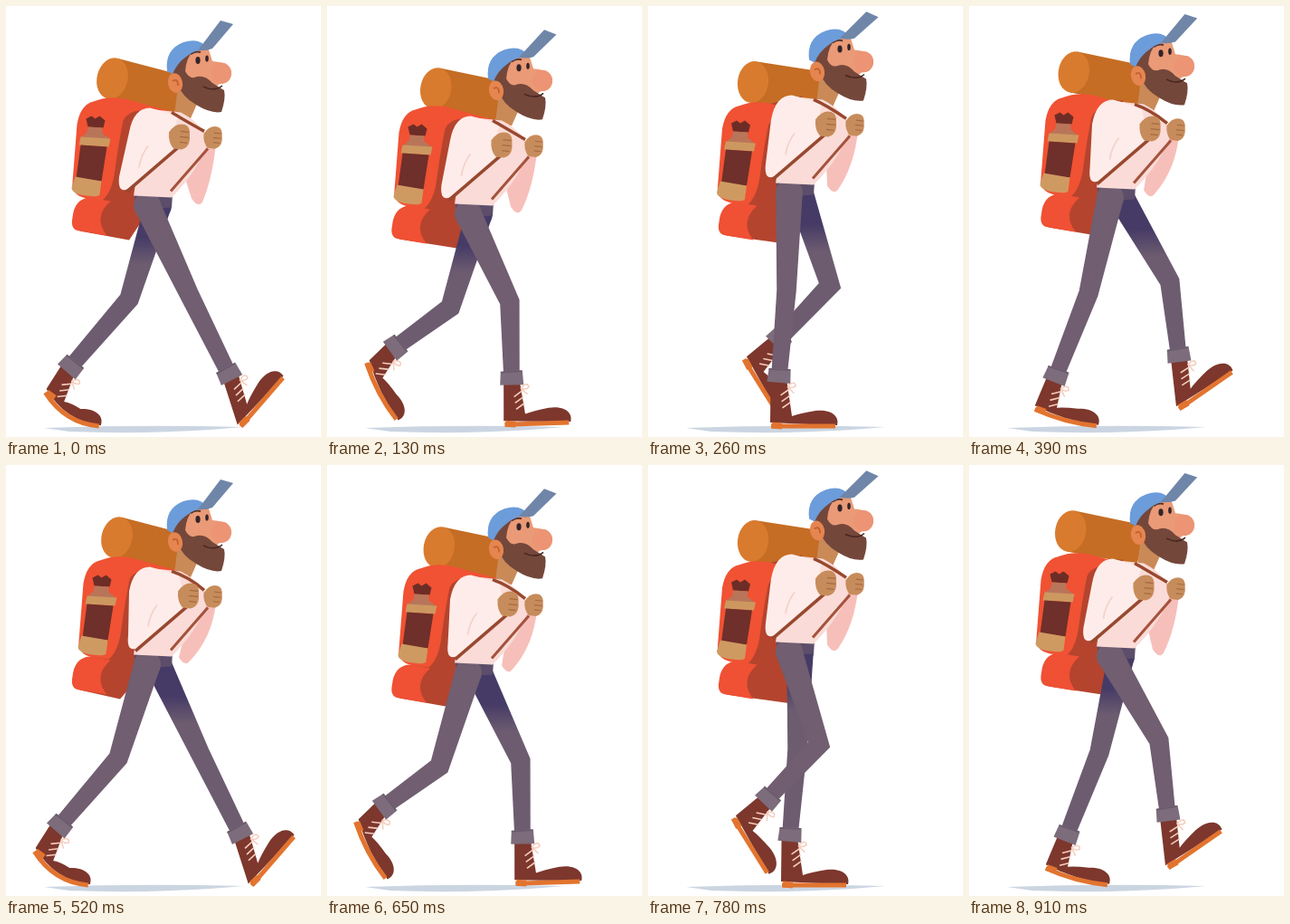
These frames come from a looping animation (348 by 476 pixels, 1040 ms). An HTML page with a canvas:

```html
<!DOCTYPE html>
<html lang="en">
<head>
<meta charset="utf-8">
<title>Walking hiker</title>
<style>
html, body { margin: 0; width: 348px; height: 476px; overflow: hidden; background: #fff; }
canvas { display: block; }
</style>
</head>
<body>
<canvas id="stage" width="348" height="476"></canvas>
<script>
const ctx = document.getElementById('stage').getContext('2d');
const STEP = 130, POSES = 8, GROUND = 467;
const THIGH = 108, FOOT = 74;

// mean plus harmonics, given as cosine and sine amounts
const wave = (p, mean, ...parts) =>
  parts.reduce((sum, [c, s], i) => sum + c * Math.cos((i + 1) * p) + s * Math.sin((i + 1) * p), mean);

const fill = (d, color) => { ctx.fillStyle = color; ctx.fill(new Path2D(d)); };
const line = (d, color, width) => {
  ctx.strokeStyle = color;
  ctx.lineWidth = width;
  ctx.stroke(new Path2D(d));
};
const oval = (x, y, rx, ry, color, turn = 0) => {
  ctx.fillStyle = color;
  ctx.beginPath();
  ctx.ellipse(x, y, rx, ry, turn, 0, 7);
  ctx.fill();
};
const placed = (x, y, degrees, draw) => {
  ctx.save();
  ctx.translate(x, y);
  ctx.rotate(degrees * Math.PI / 180);
  draw();
  ctx.restore();
};
const unit = (a, b) => {
  const dx = b[0] - a[0], dy = b[1] - a[1], len = Math.hypot(dx, dy);
  return [dx / len, dy / len];
};
// point p moved by i along u and by j along v
const at = (p, u, i, v = [0, 0], j = 0) => [p[0] + u[0] * i + v[0] * j, p[1] + u[1] * i + v[1] * j];
const front = u => [u[1], -u[0]];

function boot(cuff, shin, heel, angle, bend) {
  const p = front(shin), d = [Math.cos(angle), Math.sin(angle)], n = front(d);
  const toe = at(heel, d, FOOT), mid = at(heel, d, FOOT / 2, n, -bend);
  const e = unit(mid, toe), up = front(e);
  const ankle = at(cuff, shin, 6), top = at(ankle, p, 9);
  const instep = at(heel, d, 24, n, 14 - bend / 2);
  fill(`M${at(ankle, p, -9)} L${at(heel, n, 7)} Q${at(mid, n, 5)} ${at(toe, up, 4)}
    C${at(toe, e, 3, up, 15)} ${at(toe, e, -8, up, 22)} ${at(toe, e, -24, up, 20)}
    Q${at(instep, d, 8, n, 3)} ${instep} L${top}Z`, '#7d372d');
  line(`M${at(heel, d, 1, n, 3)} Q${at(mid, n, 3)} ${at(toe, e, -2, up, 3)}`, '#e2742f', 5);
  line(`M${at(heel, d, 2, n, 4)} L${at(heel, d, 13, n, 3)}`, '#e2742f', 7);
  const down = unit(top, instep), across = front(down);
  for (const k of [9, 16, 23]) {
    const s = at(top, down, k);
    line(`M${at(s, across, 1)} L${at(s, across, -9, down, 5)}`, '#f6cdbd', 1.6);
  }
  const knot = at(top, down, 6);
  line(`M${knot} Q${at(knot, across, 8, down, -7)} ${at(knot, across, 9)}
    Q${at(knot, across, 5, down, 3)} ${knot} L${at(knot, across, 6, down, 8)}`, '#f6cdbd', 1.5);
}

// p is the phase of the stride: 0 at heel strike, half a turn later push-off
function leg(p, shift, hipY, color) {
  const hip = [156 + shift, hipY];
  const reach = wave(p, 12, [47, -9], [-4, -4], [-8, 9]);
  const knee = [155 + shift + reach, hipY + Math.sqrt(THIGH ** 2 - reach ** 2)];
  const cuff = [shift + wave(p, 146, [93, 6], [7, -12]), wave(p, 395, [4, 20], [7, -1.5])];
  const heel = [
    shift + wave(p, 129, [114, 14], [16, -17], [2, -8]),
    Math.min(GROUND, wave(p, 439, [22, 32], [9, -9], [-3, -7]))
  ];
  const angle = wave(p, 10, [-40, -17], [-19, 20], [0, 12]) * Math.PI / 180;
  const bend = 18 * Math.max(0, -Math.cos(p)) ** 3;

  const thigh = unit(hip, knee), shin = unit(knee, cuff);
  const a = front(thigh), b = front(shin), joint = unit([0, 0], [a[0] + b[0], a[1] + b[1]]);
  const half = 10 / (joint[0] * b[0] + joint[1] * b[1]);
  boot(cuff, shin, heel, angle, bend);
  oval(...hip, 15, 15, color);
  const d = `M${at(hip, a, -14)} L${at(knee, joint, -half)} L${at(cuff, b, -8)}
    L${at(cuff, b, 8)} L${at(knee, joint, half)} L${at(hip, a, 14)}Z`;
  fill(d, color);
  line(d, color, 1.5);
  fill(`M${at(cuff, b, -12, shin, -7)} L${at(cuff, b, 12, shin, -8)}
    L${at(cuff, b, 13, shin, 8)} L${at(cuff, b, -13, shin, 8)}Z`, '#7d6c7b');
  line(`M${at(cuff, b, -12, shin, -6)} L${at(cuff, b, 11, shin, -7)}`, '#685a6b', 1.5);
}

// the load trails the body's bob
function pack(p, shoulderX, shoulderY, waist) {
  const dx = wave(p, 2, [-3.5, 0]), dy = wave(p, 3, [0, 0], [-2.5, 6.5]);
  const px = wave(p, 76, [0, 0], [-2.5, -4]), py = 245 + dy;
  const qx = wave(p, 145, [5, 0], [-14, -5]), qy = 258 + dy;
  placed(wave(p, 118, [-2.5, 0], [2, 4]), wave(p, 82, [0, 0], [-2, 9]), wave(p, 11, [0, 0], [3, 0]), () => {
    fill('M0 -23 L72 -22 Q82 0 79 22 L0 23Z', '#c56d24');
    oval(0, 0, 17, 23, '#d97b2e');
  });
  fill(`M${110 + dx} ${108 + dy} L${shoulderX + 15} ${shoulderY} L168 ${waist} L${qx} ${qy}
    L${px + 8} ${py + 3} L${px + 22} ${py - 36}Z`, '#b4442e');
  fill(`M${px + 42} ${py - 30} L${px + 18} ${py - 34} Q${px + 2} ${py - 32} ${px} ${py - 12}
    Q${px - 3} ${py + 2} ${px + 8} ${py + 3} L${px + 38} ${py + 8}
    Q${px + 22} ${py - 12} ${px + 42} ${py - 30}Z`, '#f05033');
  placed(dx, dy, 0, () => {
    fill(`M98 105 Q118 97 140 104 L188 117 L192 130 Q180 120 160 116 Q138 112 131 126
      Q126 150 122 180 Q119 205 108 214 L90 212 Q73 208 75 194 L80 130 Q84 108 98 105Z`, '#f05233');
    fill('M90 124 L96 121 L100 124 L105 121 L111 126 L109 134 L92 133Z', '#6d2d26');
    fill('M92 133 L108 134 L108 140 L116 146 L84 145 L91 139Z', '#b9755a');
    fill('M84 144 L117 146 L115 155 L82 153Z', '#cd9860');
    fill('M84 153 L113 155 L107 193 L79 190Z', '#6f2f2a');
    fill('M78 188 L107 193 L105 208 Q103 211 90 209 Q74 207 74 200Z', '#cf9a62');
  });
}

function head(dy, brim) {
  placed(0, dy, 0, () => {
    fill('M190 86 L212 104 L204 122 L186 118Z', '#c98a58');
    fill('M190 74 Q194 42 222 40 L228 59 Q247 60 249 71 Q249 84 236 84 L225 92 L200 92Z', '#ea9a76');
    oval(238, 72, 11, 11.5, '#ec9474');
    fill(`M184 72 Q188 50 208 46 Q199 55 198 70 Q203 80 211 76 Q220 74 228 83 Q236 88 241 91
      Q243 100 238 115 Q226 117 210 107 Q194 98 190 84Z`, '#74473b');
    line('M218 87 Q231 93 239 86', '#45261f', 1.5);
    oval(187, 83, 8, 11, '#e58550', -0.2);
    line('M184 81 Q190 77 190 86', '#c4622f', 1.8);
    oval(212, 58, 2.6, 4, '#33242a');
    oval(222, 56, 1.8, 3.6, '#33242a');
    line('M204 51 Q210 47 215 49', '#54352e', 2);
    fill('M178 70 Q175 46 196 38 Q214 32 223 45 Q208 46 199 54 Q189 61 184 73Z', '#6c9cda');
    placed(219, 46, brim, () => fill('M-7 1 L18 -32 L32 -28 L9 -1 Q2 2 -7 1Z', '#6f86a9'));
  });
}

function hand(x, y, size) {
  placed(x, y, 0, () => {
    ctx.scale(size, size);
    fill('M-12 -5 Q-6 -14 2 -14 Q10 -14 11 -6 L11 3 Q10 12 2 14 L-7 13 Q-13 6 -12 -5Z', '#c78c5b');
    line('M1 -6 L10 -5 M0 0 L10 1 M0 6 L8 7', '#a56a40', 1.2);
  });
}

function torso(p, bob, sx, sy, w) {
  const swing = Math.cos(p);
  const nx = 197 - 5 * swing, ny = 141 + bob;
  const fx = 229, fy = 142 + bob;
  const ex = 130 - 5 * swing, ey = 199 + bob;
  const gx = 207 + 7 * swing, gy = 216 + bob;
  // far sleeve
  fill(`M${fx - 16} ${fy + 2} L${fx + 3} ${fy + 6} Q${fx - 1} ${fy + 45} ${gx + 3} ${gy - 3}
    Q${gx - 2} ${gy + 4} ${gx - 9} ${gy - 7} L${fx - 32} ${fy + 42}Z`, '#f7bfba');
  head(0.9 * bob - 1, wave(p, 4, [0, 0], [-4, 1.5]));
  fill(`M${sx} ${sy} L${sx + 38} ${sy + 4} Q${fx - 12} ${fy - 16} ${fx - 6} ${fy + 4}
    Q${fx - 16} ${fy + 36} 183 ${w + 1} L141 ${w - 1}Z`, '#fadbd7');
  line(`M${fx - 6} ${fy + 12} L182 ${w - 6}`, '#a4523c', 3);
  // near sleeve
  fill(`M${sx + 4} ${sy - 1} Q${sx - 14} ${sy - 1} ${sx - 19} ${sy + 26} L${ex} ${ey - 14}
    Q${ex - 2} ${ey + 4} ${ex + 9} ${ey} L${nx - 3} ${ny + 14} L${nx - 7} ${ny - 8}
    L${sx + 36} ${sy + 8}Z`, '#fdece9');
  line(`M${ex + 22} ${ey - 24} Q${ex + 24} ${ey - 38} ${ex + 32} ${ey - 48}`, '#f6cfca', 1.6);
  line(`M${nx - 2} ${ny + 12} L${ex + 8} ${ey + 3}`, '#98482f', 3.5);
  line(`M${sx + 28} ${sy + 4} Q${nx} ${ny - 21} ${fx - 10} ${fy - 7}`, '#98482f', 3.5);
  hand(fx, fy, 0.88);
  hand(nx, ny, 1);
}

function draw(p) {
  // two bobs per stride: low just after heel strike, high as the legs pass
  const bob = wave(p, 0, [0, 0], [7, 9], [0, 0], [-3.6, 0]);
  const waist = 207 + bob, shoulderX = 155, shoulderY = 110 + bob;
  ctx.clearRect(0, 0, 348, 476);
  ctx.lineJoin = 'round';
  fill('M42 466 Q150 462 262 465 L225 468 Q150 473 70 470Z', '#cbd5e2');
  pack(p, shoulderX, shoulderY, waist);

  const shade = ctx.createLinearGradient(0, waist + 45, 0, waist + 75);
  shade.addColorStop(0, '#463b66');
  shade.addColorStop(1, '#6d5c70');
  leg(p + Math.PI, 12, waist + 10, shade);
  fill(`M141 ${waist - 3} H184 L183 ${waist + 12} L145 ${waist + 14}Z`, '#5c4d6a');
  leg(p, 0, waist + 10, '#715e71');
  torso(p, bob, shoulderX, shoulderY, waist);
}

function tick() {
  const pose = Math.floor(performance.now() / STEP) % POSES;
  draw(pose / POSES * 2 * Math.PI);
  requestAnimationFrame(tick);
}
tick();
</script>
</body>
</html>
```
